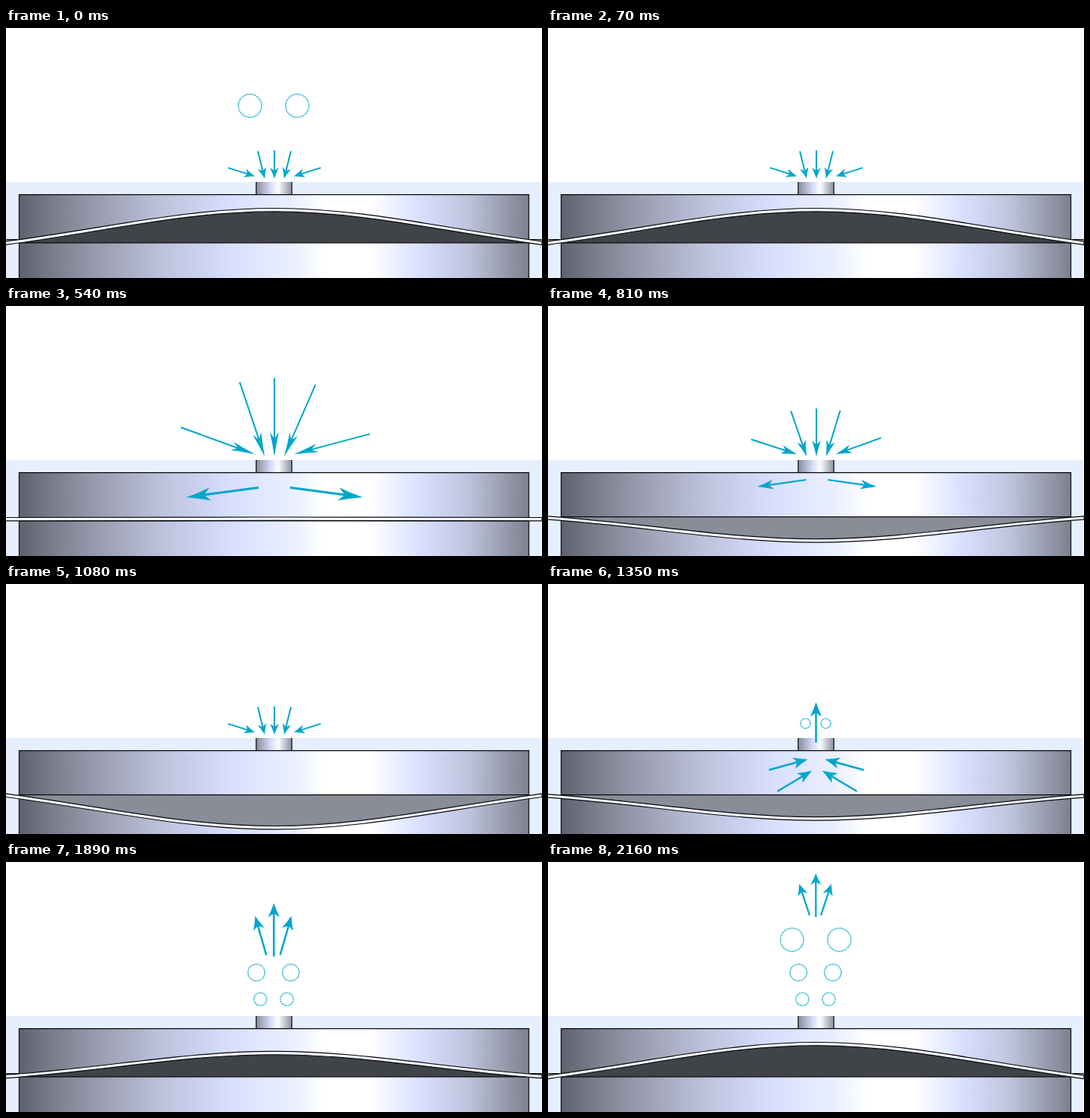
An HTML page for the animation above (2.43 s loop, 701 by 328 pixels).

```html
<!DOCTYPE html>
<html lang="en">
<head>
<meta charset="utf-8">
<title>Diaphragm jet</title>
<style>
  html, body { margin: 0; width: 100%; height: 100%; overflow: hidden; background: #fff; }
  svg { display: block; width: 701px; height: 328px; }
  .scene { animation: show 2430ms step-end infinite; }
  .brief { animation: brief 2430ms step-end infinite; }
  .air { fill: none; stroke: #00a6cc; }
  .head { fill: #00a6cc; }
  .ring { stroke-width: 1.5; stroke-dasharray: 1.5 1; }
  .line { fill: none; stroke: #08080c; stroke-width: 1.2; }
  .band { fill: #f5f8fe; }
  @keyframes show { 0% { visibility: visible; } 11.1112%, 100% { visibility: hidden; } }
  @keyframes brief { 0% { opacity: 1; } 2.8807%, 100% { opacity: 0; } }
</style>
</head>
<body>
<svg id="stage" viewBox="0 0 701 328">
  <defs>
    <linearGradient id="metal" gradientUnits="userSpaceOnUse" x1="17" x2="684" y1="0" y2="0">
      <stop offset="0" stop-color="#5f626d"/>
      <stop offset=".06" stop-color="#777a88"/>
      <stop offset=".15" stop-color="#989bae"/>
      <stop offset=".28" stop-color="#bdc2dc"/>
      <stop offset=".42" stop-color="#d8e0ff"/>
      <stop offset=".54" stop-color="#ebf0ff"/>
      <stop offset=".6" stop-color="#fff"/>
      <stop offset=".69" stop-color="#fff"/>
      <stop offset=".78" stop-color="#dae2ff"/>
      <stop offset=".88" stop-color="#bfc4de"/>
      <stop offset="1" stop-color="#7d808d"/>
    </linearGradient>
    <linearGradient id="neck">
      <stop offset="0" stop-color="#868999"/>
      <stop offset=".4" stop-color="#d5dbf8"/>
      <stop offset=".62" stop-color="#fbfcff"/>
      <stop offset="1" stop-color="#8b8e9e"/>
    </linearGradient>
    <clipPath id="inside"><path d="M17 219H684V328H17Z"/></clipPath>
  </defs>
  <path d="M0 202H700V328H0Z" fill="#e6effe"/>
  <path d="M17 219H684V328H17Z" fill="url(#metal)"/>
  <path d="M327 202H374V219H327Z" fill="url(#neck)"/>
  <path class="line" d="M17.2 328V218.7H683.8V328M327.2 202V219M373.8 202V219"/>
</svg>
<script>
const LOOP = 2430, STEP = 270, MID = 351;

// One face of the diaphragm, drawn left to right or back again
function face(lift, drop, back) {
  const edge = 277.5 + lift * .06 + drop;
  const shoulder = 277.5 - lift * Math.abs(lift) * .009 + drop;
  const crown = 277 - lift + drop;
  const x = v => back ? 701 - v : v;
  return `${x(0)} ${edge}C${x(130)} ${shoulder} ${x(235)} ${crown} ${MID} ${crown}` +
    `C${x(467)} ${crown} ${x(571)} ${shoulder} ${x(701)} ${edge}`;
}

function diaphragm(lift) {
  const up = lift > 1, down = lift < -1, base = down ? 276.7 : 281.8;
  const fill = up ? '#404348' : down ? '#8a8c98' : 'none';
  return `<path clip-path="url(#inside)" d="M${face(lift, 0)}V${base}H0Z" fill="${fill}"/>` +
    `<path class="line" d="M17 ${base}H684"/>` +
    (up ? '<path class="line" d="M0 277.7H17M684 277.7H701"/>' : '') +
    `<path class="line band" d="M${face(lift, 0)}L${face(lift, 4.4, true)}"/>`;
}

function arrow(x, y, tipX, tipY, len, wide, weight = 2) {
  const dx = tipX - x, dy = tipY - y, turn = Math.atan2(dy, dx) * 180 / Math.PI;
  const notch = -len * .74, h = wide / 2, bend = -len * .55;
  return `<g transform="translate(${tipX} ${tipY}) rotate(${turn})">` +
    `<path class="air" stroke-width="${weight}" d="M${-Math.hypot(dx, dy)} 0H${notch}"/>` +
    `<path class="head" d="M0 0Q${bend} ${-h * .45} ${-len} ${-h}L${notch} 0L${-len} ${h}Q${bend} ${h * .45} 0 0Z"/></g>`;
}

// Two arrows mirrored about an axis
const pair = (x, y, tipX, tipY, axis, ...style) => [-1, 1].map(s =>
  arrow(axis + s * x, y, axis + s * tipX, tipY, ...style)).join('');

// Five arrows into the neck; angles are measured from the vertical
function inflow(reach, lean, side, tilt) {
  return [-2, -1, 0, 1, 2].map(k => {
    const outer = Math.abs(k) > 1;
    const a = Math.sign(k) * ((outer ? side : lean) + Math.sign(k) * tilt) * Math.PI / 180;
    const x = MID + k * 12.7, y = outer ? 194.5 : 197.5;
    return arrow(x + reach * Math.sin(a), y - reach * Math.cos(a), x, y, 4 + reach * .27, 11.5);
  }).join('');
}

// Three arrows leaving upwards
function plume(base, len) {
  const style = [len * .26, 8 + len * .1, 1 + len * .022];
  return arrow(350.3, base, 350.3, base - len, ...style) +
    pair(len * .13, base - 2, 9 + len * .21, base - len * .76, 349.5, ...style);
}

const rings = (y, r) => [-1, 1].map(s =>
  `<circle class="air ring" cx="${350 + s * (2 * r + .5)}" cy="${y}" r="${r}"/>`).join('');

const small = rings(180, 8.4), medium = rings(145, 11), big = rings(102, 15.2);
const sip = inflow(37, 14, 72.5, 0);
const spread = pair(14, 228, 78, 237, 351.7, 21, 13, 2.2);
const squeeze = pair(62, 244, 11.3, 230, MID, 19, 15, 2.5);

const scenes = [
  sip + `<g class="brief">${big}</g>`,
  inflow(63, 22, 76, 2) + spread,
  inflow(103, 21, 72.5, 2.5) + pair(20.5, 238.2, 115.5, 251, MID, 32, 17, 3),
  inflow(63, 18, 71, -1) + spread,
  sip,
  squeeze + pair(52, 272, 6.7, 245, 352, 19, 15, 2.5) + arrow(350.5, 208, 350.5, 155, 19, 15, 2.5) + rings(183, 6.4),
  squeeze + plume(166, 81) + small,
  plume(124, 70) + small + medium,
  plume(72, 57) + small + medium + big
];

document.getElementById('stage').insertAdjacentHTML('beforeend', scenes.map((air, i) =>
  `<g class="scene" style="animation-delay:${i * STEP - (i && LOOP)}ms">` +
  `${diaphragm(40.5 * Math.cos(i * Math.PI / 4))}${air}</g>`
).join(''));
</script>
</body>
</html>
```
